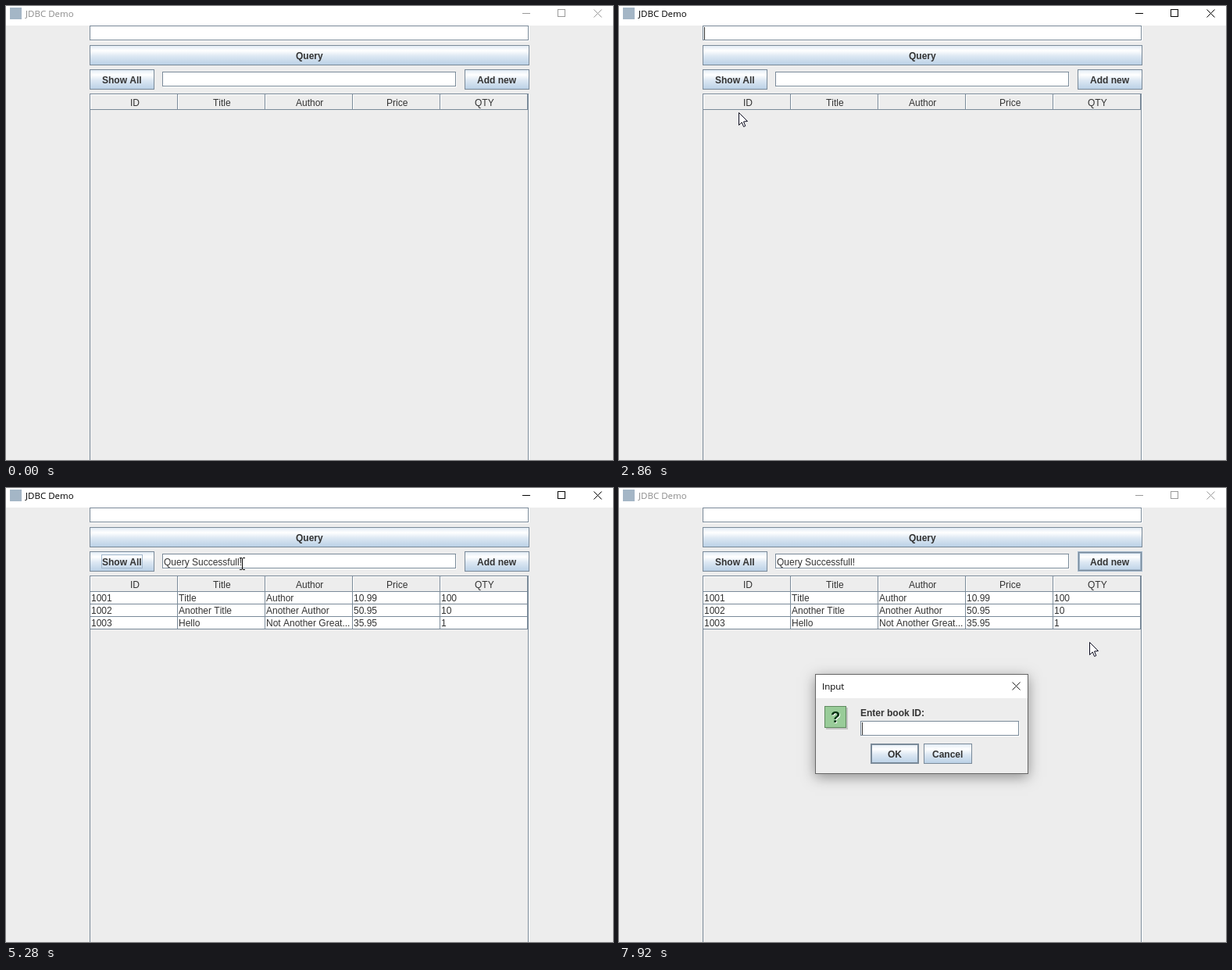
An HTML page with a canvas that plays this animation: 777 by 581 pixels, repeating every 8 s.

```html
<!DOCTYPE html>
<html lang="en">
<head>
<meta charset="utf-8">
<title>JDBC Demo</title>
<style>
  html, body { margin: 0; height: 100%; overflow: hidden; }
  canvas { display: block; }
</style>
</head>
<body>
<canvas id="stage" width="777" height="581"></canvas>
<script>
const ctx = document.getElementById('stage').getContext('2d');
const LOOP = 8000, STEP = 77;
const PANEL = '#ededed', EDGE = '#7a8a99', SOFT = '#a3b8cc', PRESSED = '#b8cfe5', INK = '#333';
const PLAIN = '12px "Liberation Sans", Arial, sans-serif';
const BOLD = 'bold ' + PLAIN;
const TITLE = '11.5px "Open Sans", sans-serif';

const ACTIVATE = 1850, SHOW_PRESS = 3730, ROWS_IN = 3810;
const ADD_PRESS = 7450, ADD_RELEASE = 7607, DIALOG_IN = 7685;

const HEADERS = ['ID', 'Title', 'Author', 'Price', 'QTY'];
const ROWS = [
  ['1001', 'Title', 'Author', '10.99', '100'],
  ['1002', 'Another Title', 'Another Author', '50.95', '10'],
  ['1003', 'Hello', 'Not Another Great...', '35.95', '1'],
];

// Each glide starts where the last one ended; bend is the control point of a curve
const GLIDES = [
  { from: 990, to: 1530, end: [240, 260] },
  { from: 2230, to: 2230, end: [194, 260] },
  { from: 2310, to: 2390, end: [31, 45] },
  { from: 2470, to: 2710, end: [153, 136], bend: [420, 110] },
  { from: 3110, to: 3410, end: [154, 102] },
  { from: 4520, to: 4520, end: [153, 107] },
  { from: 4595, to: 4820, end: [178, 130] },
  { from: 4970, to: 5350, end: [306, 96] },
  { from: 5910, to: 6218, end: [266, 123] },
  { from: 6297, to: 6680, end: [659, 110], bend: [800, 310] },
  { from: 6760, to: 6990, end: [617, 98] },
  { from: 7763, to: 7920, end: [602, 197] },
];
const APPEAR = 290, ENTRY = [616, 546];
const CLICKS = [[ACTIVATE, 1990], [SHOW_PRESS, ROWS_IN], [7528, ADD_RELEASE]];

const between = (t, a, b) => t >= a && t < b;
const inside = (p, x, y, w, h) => !!p && between(p[0], x, x + w) && between(p[1], y, y + h);

function pointerAt(t) {
  if (t < APPEAR) return null;
  let pos = ENTRY;
  for (const { from, to, end, bend } of GLIDES) {
    if (t < from) break;
    const count = Math.round((to - from) / STEP) + 1;
    const step = Math.min(count, Math.floor((t - from) / STEP + 1.1));
    const u = Math.sin(step / count * Math.PI / 2);
    pos = pos.map((a, axis) => {
      const b = end[axis], mid = bend ? bend[axis] : (a + b) / 2;
      return Math.round((1 - u) ** 2 * a + 2 * u * (1 - u) * mid + u * u * b);
    });
  }
  return pos;
}

function rect(x, y, w, h, color) {
  ctx.fillStyle = color;
  ctx.fillRect(x, y, w, h);
}

function frame(x, y, w, h, color) {
  ctx.strokeStyle = color;
  ctx.lineWidth = 1;
  ctx.strokeRect(x + .5, y + .5, w - 1, h - 1);
}

function text(str, x, y, font = PLAIN, color = INK) {
  ctx.font = font;
  ctx.fillStyle = color;
  ctx.fillText(str, x, y);
}

// Centred on whole pixels; returns left edge and width
function label(str, cx, y, font = PLAIN, color = INK) {
  ctx.font = font;
  const width = Math.round(ctx.measureText(str).width);
  const left = Math.floor(cx - width / 2);
  text(str, left, y, font, color);
  return [left, width];
}

function cross(x, y, color) {
  ctx.strokeStyle = color;
  ctx.lineWidth = 1;
  ctx.beginPath();
  ctx.moveTo(x + .5, y + .5); ctx.lineTo(x + 10.5, y + 10.5);
  ctx.moveTo(x + 10.5, y + .5); ctx.lineTo(x + .5, y + 10.5);
  ctx.stroke();
}

function field(x, y, w, h, value = '') {
  rect(x + 1, y + 1, w - 1, h - 1, '#fff');
  frame(x, y, w - 1, h - 1, EDGE);
  text(value, x + 2, y + 15);
}

function button(name, x, y, w, { pressed, hover, focus, main } = {}) {
  const h = 26;
  const fill = ctx.createLinearGradient(0, y, 0, y + h);
  ['#dde8f3', '#fff', '#dde8f3'].forEach((color, i) => fill.addColorStop(i * .27, color));
  fill.addColorStop(1, PRESSED);
  rect(x, y, w, h, pressed ? PRESSED : fill);
  frame(x, y, w, h, hover && !pressed ? SOFT : EDGE);
  if (pressed) {
    rect(x, y, w, 2, EDGE);
    rect(x, y, 2, h, EDGE);
  } else if (hover || main) {
    frame(x + 1, y + 1, w - 2, h - 2, EDGE);
    if (hover) frame(x + 2, y + 2, w - 4, h - 4, SOFT);
  }
  const [left, width] = label(name, x + w / 2, y + 18, BOLD);
  if (focus) frame(left - 1, y + 4, width + 2, 18, SOFT);
}

function titleBar(active) {
  const color = active ? '#000' : '#999';
  rect(0, 0, 777, 25, '#fff');
  rect(5, 2, 15, 15, '#a4b6c6');
  text('JDBC Demo', 25, 14, TITLE, active ? '#000' : '#8c8c8c');
  rect(661, 9, 10, 1, color);
  frame(706, 4, 10, 10, color);
  cross(752, 4, color);
}

function table(filled) {
  rect(669, 113, 1, 468, '#fff');
  frame(107, 112, 562, 480, EDGE);
  HEADERS.forEach((name, col) => {
    const x = 108 + col * 112;
    frame(x, 113, 112, 20, '#fff');
    rect(x, 132, 112, 1, EDGE);
    rect(x + 111, 113, 1, 20, EDGE);
    label(name, x + 57, 128);
    if (!filled) return;
    ROWS.forEach((row, i) => {
      const y = 133 + i * 16;
      rect(x, y, 111, 15, '#fff');
      rect(x, y + 15, 112, 1, EDGE);
      rect(x + 111, y, 1, 16, EDGE);
      text(row[col], x + 1, y + 12);
    });
  });
}

function dialog() {
  ctx.save();
  ctx.shadowColor = 'rgba(0,0,0,.4)';
  ctx.shadowBlur = 16;
  ctx.shadowOffsetY = 4;
  rect(251, 238, 273, 128, PANEL);
  ctx.restore();
  rect(252, 239, 271, 30, '#fff');
  frame(251, 238, 273, 128, '#666');
  text('Input', 260, 258, TITLE, '#000');
  cross(503, 248, '#222');

  rect(265, 281, 28, 28, '#c4c4c4');
  rect(263, 279, 28, 28, '#9c9');
  frame(263, 279, 28, 28, '#5f8a5f');
  const markFont = 'bold 20px "Liberation Sans", Arial, sans-serif';
  label('?', 278, 301, markFont, '#fff');
  label('?', 277, 300, markFont, '#031');

  text('Enter book ID:', 309, 292, BOLD);
  field(309, 298, 204, 20);
  rect(311, 300, 1, 16, INK);
  button('OK', 322, 327, 62, { main: true });
  button('Cancel', 390, 327, 62);
}

function arrow([x, y]) {
  ctx.beginPath();
  [[.5, .5], [.5, 16.5], [4.2, 12.9], [6.6, 18.5], [8.8, 17.5], [6.5, 12], [11.5, 11.5]]
    .forEach(([dx, dy]) => ctx.lineTo(x + dx, y + dy));
  ctx.closePath();
  ctx.fillStyle = '#fff';
  ctx.fill();
  ctx.lineWidth = 1;
  ctx.strokeStyle = '#0a0a1e';
  ctx.stroke();
}

function textBeam([x, y]) {
  rect(x, y - 7, 1, 14, '#000');
  [-8, 7].forEach(dy => {
    rect(x - 3, y + dy, 3, 1, '#000');
    rect(x + 1, y + dy, 3, 1, '#000');
  });
}

function halo([x, y]) {
  ctx.beginPath();
  ctx.arc(x, y, 12, 0, Math.PI * 2);
  ctx.fillStyle = 'rgba(238,232,30,.6)';
  ctx.fill();
}

function draw(t) {
  const pointer = pointerAt(t);
  const asking = t >= DIALOG_IN;
  const filled = t >= ROWS_IN;

  ctx.fontKerning = 'none';
  rect(0, 0, 777, 581, PANEL);
  titleBar(t >= ACTIVATE && !asking);

  field(107, 25, 563, 20);
  const blinkOn = Math.trunc((t - 1860) / 500) % 2 === 0;
  if (between(t, ACTIVATE, 3360) && blinkOn) rect(109, 27, 1, 16, INK);

  button('Query', 107, 50, 563, { hover: inside(pointer, 107, 50, 563, 26) });
  button('Show All', 107, 81, 83, {
    pressed: between(t, SHOW_PRESS, ROWS_IN),
    hover: inside(pointer, 107, 81, 83, 26),
    focus: between(t, SHOW_PRESS, ADD_PRESS),
  });
  field(200, 84, 377, 20, filled ? 'Query Successfull!' : '');
  button('Add new', 587, 81, 83, {
    pressed: between(t, ADD_PRESS, ADD_RELEASE),
    hover: asking || inside(pointer, 587, 81, 83, 26),
    focus: between(t, ADD_PRESS, DIALOG_IN),
  });
  table(filled);
  if (asking) dialog();

  if (!pointer) return;
  if (CLICKS.some(([from, to]) => between(t, from, to))) halo(pointer);
  (inside(pointer, 200, 84, 376, 19) ? textBeam : arrow)(pointer);
}

const start = performance.now();
function tick() {
  draw((performance.now() - start) % LOOP);
  requestAnimationFrame(tick);
}
tick();
</script>
</body>
</html>
```
